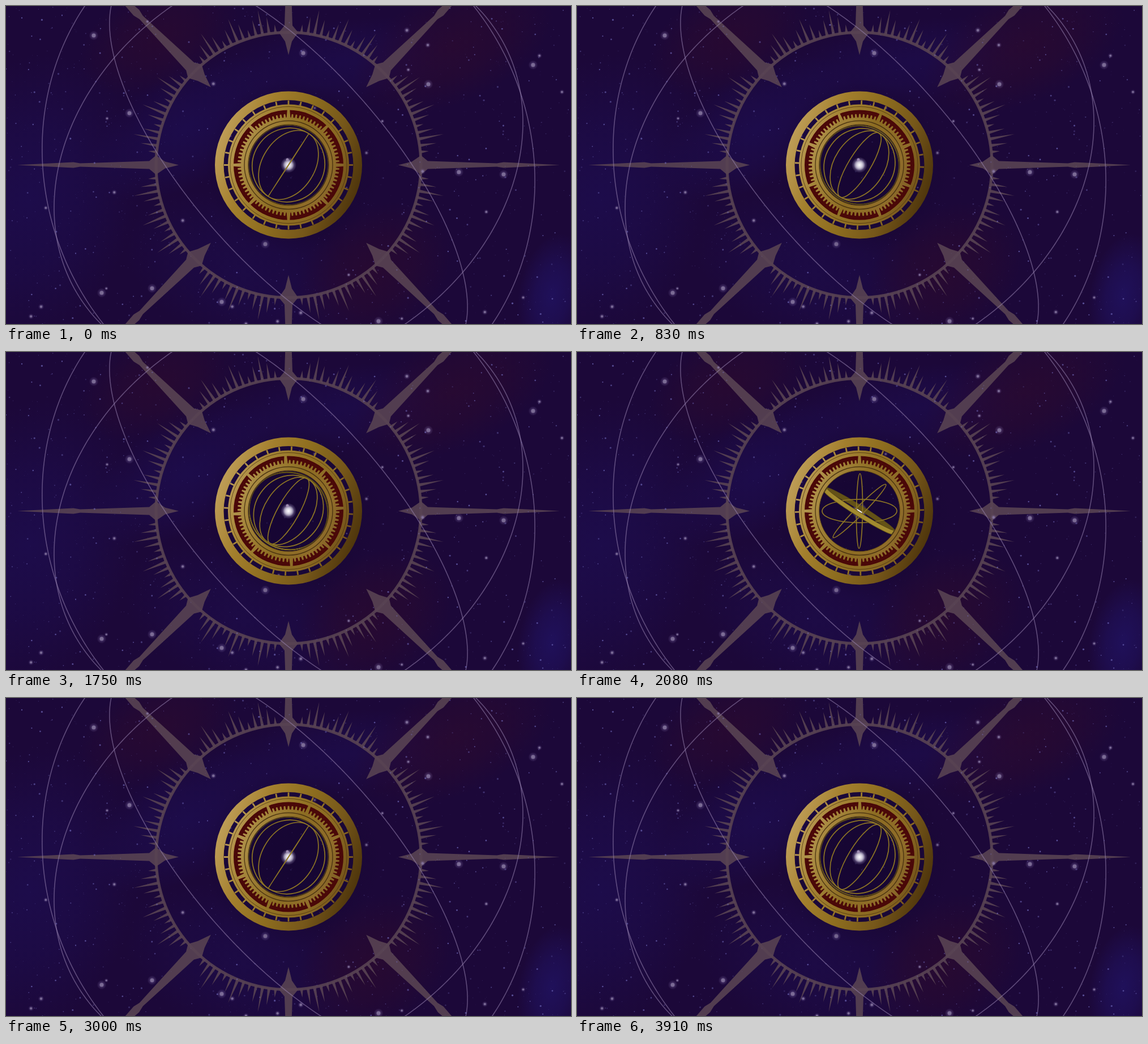
An HTML page with a canvas that plays this animation: 998 by 561 pixels, repeating every 4 s.

```html
<!DOCTYPE html>
<html lang="en">
<head>
<meta charset="utf-8">
<title>Astrolabe</title>
<style>
html, body { margin: 0; width: 100%; height: 100%; overflow: hidden; background: #1b0a3b; }
canvas { display: block; }
</style>
</head>
<body>
<canvas id="stage" width="998" height="561"></canvas>
<script>
const W = 998, H = 561, CX = 499, CY = 280.5, TAU = Math.PI * 2;
const LOOP = 4000, FPS = 12;
const rad = deg => deg * Math.PI / 180;
const ctx = document.getElementById('stage').getContext('2d');

function layer(paint) {
  const canvas = document.createElement('canvas');
  canvas.width = W;
  canvas.height = H;
  paint(canvas.getContext('2d'));
  return canvas;
}

function seeded(seed) {
  return () => {
    seed = (seed * 1664525 + 1013904223) % 4294967296;
    return seed / 4294967296;
  };
}

function disc(g, x, y, r, fill) {
  g.fillStyle = fill;
  g.beginPath();
  g.arc(x, y, r, 0, TAU);
  g.fill();
}

function annulus(g, outer, inner, fill) {
  g.fillStyle = fill;
  g.beginPath();
  g.arc(CX, CY, outer, 0, TAU);
  g.arc(CX, CY, inner, 0, TAU, true);
  g.fill();
}

function circle(g, r, color, width) {
  g.strokeStyle = color;
  g.lineWidth = width;
  g.beginPath();
  g.arc(CX, CY, r, 0, TAU);
  g.stroke();
}

function cloud(g, x, y, rx, ry, tilt, rgb, alpha) {
  g.save();
  g.translate(x, y);
  g.rotate(rad(tilt));
  g.scale(rx, ry);
  const glow = g.createRadialGradient(0, 0, 0, 0, 0, 1);
  glow.addColorStop(0, `rgba(${rgb},${alpha})`);
  glow.addColorStop(0.5, `rgba(${rgb},${alpha * 0.65})`);
  glow.addColorStop(1, `rgba(${rgb},0)`);
  disc(g, 0, 0, 1, glow);
  g.restore();
}

function paintSky(g) {
  g.fillStyle = '#1c0839';
  g.fillRect(0, 0, W, H);
  const blue = '30,16,92', wine = '44,10,46';
  cloud(g, 40, 340, 190, 260, 15, blue, 0.5);
  cloud(g, 320, 215, 190, 100, -30, blue, 0.5);
  cloud(g, 590, 100, 240, 75, -8, blue, 0.4);
  cloud(g, 965, 510, 60, 110, 10, '34,22,112', 0.6);
  cloud(g, 420, 470, 220, 130, 20, blue, 0.35);
  cloud(g, 270, 55, 150, 90, -25, wine, 0.7);
  cloud(g, 790, 70, 190, 100, -25, wine, 0.7);
  cloud(g, 650, 470, 150, 110, -35, wine, 0.7);
}

// [radius, half width] pairs along the spike's axis.
const SPIKE = [[194, 0], [218, 6], [234, 17], [246, 7], [368, 3], [380, 5], [479, 0]];

function paintSpike(g, widen) {
  const half = w => w > 10 ? w : w * widen;
  g.beginPath();
  SPIKE.forEach(([r, w]) => g.lineTo(r, -half(w)));
  [...SPIKE].reverse().forEach(([r, w]) => g.lineTo(r, half(w)));
  g.fill();
}

function paintRay(g, length) {
  g.beginPath();
  g.moveTo(234, -2.8);
  g.lineTo(234 + length, 0);
  g.lineTo(234, 2.8);
  g.fill();
}

function paintSun(g) {
  const color = '#584353';
  g.save();
  g.globalAlpha = 0.9;
  circle(g, 234, color, 5);
  g.fillStyle = color;
  g.translate(CX, CY);
  for (let i = 0; i < 128; i++) {
    const step = i % 16;
    if (step === 0) paintSpike(g, i % 32 ? 1.4 : 1);
    else if (step > 1 && step < 15) paintRay(g, 30 + 15 * Math.cos(step * Math.PI / 2));
    g.rotate(TAU / 128);
  }
  g.restore();
}

// Closed curve a*x^2 + b*x*y + c*y^2 = 1e6 around the centre.
function orbit(g, a, b, c) {
  g.beginPath();
  for (let i = 0; i <= 360; i++) {
    const x = Math.cos(rad(i)), y = Math.sin(rad(i));
    const r = 1000 / Math.sqrt(a * x * x + b * x * y + c * y * y);
    g.lineTo(CX + r * x, CY + r * y);
  }
  g.stroke();
}

function paintStar(g, x, y, r) {
  cloud(g, x, y, r * 2.4, r * 2.4, 0, '150,130,190', 0.4);
  disc(g, x, y, r, 'rgba(133,118,158,.85)');
}

const LANDMARK_STARS = [[155, 52], [218, 189], [258, 498], [169, 506], [381, 522],
  [458, 420], [525, 83], [746, 138], [931, 104], [800, 293], [879, 297], [658, 556]];

function paintStars(g) {
  const random = seeded(77);
  for (let i = 0; i < 1300; i++) {
    const r = 0.4 + random() ** 4 * 1.3;
    const color = `rgba(118,112,195,${0.2 + random() * 0.5})`;
    disc(g, random() * W, random() * H, r, color);
  }
  for (let i = 0; i < 30; i++) paintStar(g, random() * W, random() * H, 1.5 + random());
  LANDMARK_STARS.forEach(([x, y]) => paintStar(g, x, y, 3.5));
}

function paintBackdrop(g) {
  paintSky(g);
  paintSun(g);
  g.strokeStyle = 'rgba(150,130,175,.55)';
  g.lineWidth = 1.6;
  orbit(g, 5.3, -0.62, 4.78);
  orbit(g, 20.95, -27.65, 17.46);
  orbit(g, 6.08, 2.711, 7.439);
  paintStars(g);
  cloud(g, CX + 6, CY + 4, 155, 155, 0, '20,5,48', 0.8);
  cloud(g, CX, CY, 14, 14, 0, '225,215,255', 0.7);
  cloud(g, CX, CY, 10, 10, 0, '255,255,255', 0.95);
  disc(g, 497, 271, 2.5, '#9d8bb0');
}

function gold(...colors) {
  const fill = ctx.createLinearGradient(375, 235, 623, 326);
  colors.forEach((color, i) => fill.addColorStop(i / (colors.length - 1), color));
  return fill;
}
const RIM = gold('#bf9e58', '#a37f2d', '#8d6d1f', '#76571a', '#4e350c');
const BAND = gold('#c2a360', '#a58436', '#917123', '#886722', '#6a4917');
const GEAR = gold('#c2a665', '#a5863c', '#8c6c22', '#906d2a', '#6f5020');

function spokes(count, inner, outer, innerWidth, outerWidth, turn) {
  ctx.beginPath();
  for (let i = 0; i < count; i++) {
    const a = turn + i * TAU / count, c = Math.cos(a), s = Math.sin(a);
    const at = (r, w) => [CX + r * c - w * s, CY + r * s + w * c];
    ctx.moveTo(...at(inner, -innerWidth / 2));
    ctx.lineTo(...at(outer, -outerWidth / 2));
    ctx.lineTo(...at(outer, outerWidth / 2));
    ctx.lineTo(...at(inner, innerWidth / 2));
    ctx.closePath();
  }
  ctx.fill();
}

function drawDial(gearTurn, scaleTurn) {
  annulus(ctx, 130, 114.5, RIM);
  ctx.fillStyle = BAND;
  spokes(32, 105, 114, 2.8, 2.8, scaleTurn);
  annulus(ctx, 107, 96, BAND);
  circle(ctx, 103, 'rgba(75,49,12,.75)', 1);
  annulus(ctx, 97, 82, '#4a0808');
  ctx.fillStyle = GEAR;
  spokes(8, 82, 97.5, 7, 4.5, gearTurn);
  spokes(80, 82, 90, 4.4, 2.6, gearTurn);
  annulus(ctx, 84, 71, GEAR);
  circle(ctx, 78, 'rgba(65,43,15,.85)', 1.4);
  circle(ctx, 71.3, 'rgba(70,50,15,.8)', 1);
}

function drawThinRing(tilt, ratio) {
  ctx.strokeStyle = '#8d7524';
  ctx.lineWidth = 1.7;
  ctx.beginPath();
  ctx.ellipse(CX, CY, Math.max(0.2, 66 * ratio), 66, rad(tilt), 0, TAU);
  ctx.stroke();
}

// The rings share an axis at rest; each beat kicks them apart and they settle back.
function drawThinRings(phase) {
  const start = Math.min(1, phase * 8);
  const kick = 1.75 * start * (1 - phase) ** 2;
  drawThinRing(33 - 33 * kick, 0.3 * start - 0.12 * kick);
  drawThinRing(33 + 12 * kick, 0.7 - 0.6 * kick);
  drawThinRing(33 + 58 * kick, 0.96 - 0.66 * kick);
}

// One half of the wide hoop, as a strip between two shifted half ellipses.
function drawHoopHalf(turn, start, fill) {
  const R = 70, squash = R * Math.cos(turn), shift = 4 * Math.sin(turn);
  ctx.beginPath();
  for (const side of [1, -1]) {
    for (let i = 0; i <= 48; i++) {
      const a = start + Math.PI * (side > 0 ? i : 48 - i) / 48;
      ctx.lineTo(R * Math.cos(a), squash * Math.sin(a) + side * shift);
    }
  }
  ctx.closePath();
  ctx.fillStyle = fill;
  ctx.fill();
  ctx.strokeStyle = '#594914';
  ctx.lineWidth = 0.9;
  ctx.stroke();
}

function drawHoop(turn, lit) {
  const litStart = Math.sin(turn) < 0 ? Math.PI : 0;
  ctx.save();
  ctx.translate(CX, CY);
  ctx.rotate(rad(32));
  if (lit) drawHoopHalf(turn, litStart, '#a28a2f');
  else drawHoopHalf(turn, Math.PI - litStart, '#645217');
  ctx.restore();
}

// Rests for half a beat, then springs forward with a slight overshoot.
function tick(phase) {
  const p = Math.max(0, phase * 2 - 1);
  return 1 - (1 - p) ** 1.3 * Math.cos(2.44 * p);
}

const backdrop = layer(paintBackdrop);

function draw(now) {
  const frame = Math.floor((now % LOOP + 4) * FPS / 1000) % 48;
  const seconds = frame / FPS, beat = Math.floor(seconds), phase = seconds - beat;
  const direction = beat % 2 ? -1 : 1;
  const hoopTurn = direction * Math.PI * phase ** 0.3;

  ctx.drawImage(backdrop, 0, 0);
  drawDial(rad(22.5) * (beat + tick(phase)), -rad(11.25) * seconds);
  drawHoop(hoopTurn, false);
  drawThinRings(phase);
  drawHoop(hoopTurn, true);
}

const origin = performance.now();
function loop() {
  draw(performance.now() - origin);
  requestAnimationFrame(loop);
}
loop();
</script>
</body>
</html>
```
